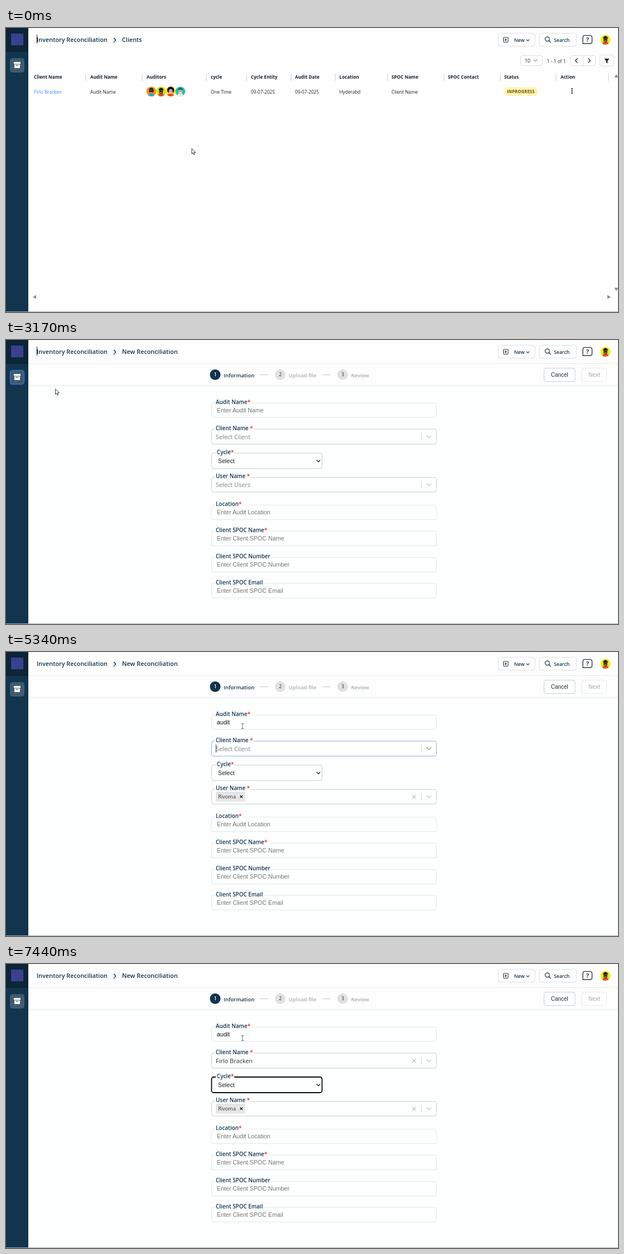
Animation, 1097 px wide and 510 px high, one loop 8000 ms. Source, as an HTML page:

```html
<!DOCTYPE html>
<html lang="en">
<head>
<meta charset="utf-8">
<title>Inventory Reconciliation</title>
<style>
  html, body { margin: 0; width: 100%; height: 100%; overflow: hidden; background: #fefefe; }
  svg { display: block; width: 100vw; height: 100vh; }
  text { font-family: "Open Sans", "Noto Sans", sans-serif; white-space: pre; }
  text.arial { font-family: "Liberation Sans", Arial, sans-serif; }
</style>
</head>
<body>
<svg id="stage" viewBox="0 0 1097 510"></svg>
<script>
(() => {
const LOOP = 8000;
const NAVY = '#12344d', INK = '#1c2b36', GREY = '#cccccc', BG = '#fdfefe';
const stage = document.getElementById('stage');

// ---- drawing helpers ----
function add(parent, tag, attrs) {
  const e = document.createElementNS('http://www.w3.org/2000/svg', tag);
  for (const k in attrs) e.setAttribute(k, attrs[k]);
  parent.appendChild(e);
  return e;
}
const group = (p, attrs) => add(p, 'g', attrs);
const box = (p, x, y, x2, y2, fill, attrs) =>
  add(p, 'rect', { x, y, width: x2 - x, height: y2 - y, fill, ...attrs });
const frame = (p, x, y, x2, y2, stroke, r = 3.5) =>
  box(p, x + .5, y + .5, x2 - .5, y2 - .5, 'none', { stroke, rx: r });
const line = (p, d, stroke, w = 1) =>
  add(p, 'path', { d, fill: 'none', stroke, 'stroke-width': w, 'stroke-linecap': 'round', 'stroke-linejoin': 'round' });
const shape = (p, d, fill) => add(p, 'path', { d, fill });
const dot = (p, cx, cy, r, fill) => add(p, 'circle', { cx, cy, r, fill });
function text(p, x, y, str, size, fill, weight = 400, cls = '') {
  const e = add(p, 'text', { x, y, 'font-size': size, 'font-weight': weight, fill, class: cls });
  e.textContent = str;
  return e;
}
const arial = (p, x, y, str, size, fill) => text(p, x, y, str, size, fill, 400, 'arial');
const chevron = (p, x, y, s, color, w) => line(p, `M${x - s} ${y - s / 2}l${s} ${s} ${s} ${-s}`, color, w);
const cross = (p, x, y, s, color, w) => line(p, `M${x - s} ${y - s}l${2 * s} ${2 * s}m0 ${-2 * s}l${-2 * s} ${2 * s}`, color, w);
const show = (e, on) => e.setAttribute('display', on ? 'inline' : 'none');
const put = (e, str) => { if (e.textContent !== str) e.textContent = str; };

// ---- time helpers ----
const within = (t, ranges) => ranges.some(([a, b]) => t >= a && t < b);
function track(t, keys, ease = u => u) {
  if (t <= keys[0][0]) return keys[0][1];
  for (let i = 1; i < keys.length; i++) {
    const [t0, a] = keys[i - 1], [t1, b] = keys[i];
    if (t < t1) return a + (b - a) * ease((t - t0) / (t1 - t0));
  }
  return keys[keys.length - 1][1];
}
const smooth = u => u * u * (3 - 2 * u);
const mix = (a, b, u) => `rgb(${a.map((v, i) => Math.round(v + (b[i] - v) * u))})`;
const typed = (t, word, times) => word.slice(0, times.filter(k => t >= k).length);

// ---- avatar ----
function avatar(p, x, y, bg, skin, hair, shirt, extra) {
  const g = group(p, { transform: `translate(${x} ${y})` });
  dot(g, 0, 0, 8.8, bg);
  shape(g, 'M-5.5 6.9Q-4 3.6 0 3.6T5.5 6.9Q0 10.6 -5.5 6.9Z', shirt);
  if (extra === 'afro') dot(g, 0, -2.6, 6.2, hair);
  box(g, -3.4, -4, 3.4, 4.6, skin, { rx: 3 });
  if (extra !== 'afro') shape(g, 'M-4 -1.6Q-4.6 -6.4 0 -6.4T4 -1.6Q0 -4.2 -4 -1.6Z', hair);
  if (extra === 'shades') box(g, -4.4, -2, 4.4, .8, '#1b2430', { rx: 1 });
  else { dot(g, -1.5, -.4, .55, '#111'); dot(g, 1.5, -.4, .55, '#111'); }
  line(g, 'M-1.3 2.4Q0 3.2 1.3 2.4', '#fff', .7);
}

// ---- list page ----
const list = group(stage);
box(list, 40, 0, 1097, 510, '#fefefe');
text(list, 208, 24.8, 'Clients', 10.85, NAVY, 600);
frame(list, 922, 49, 962, 68, '#dcdfe2');
text(list, 929.5, 62, '10', 9.2, INK);
chevron(list, 949, 58.4, 2.8, '#555');
text(list, 969.5, 62.5, '1 - 1 of 1', 8.46, INK);
frame(list, 1011, 49, 1057, 68, '#dcdfe2');
line(list, 'M1034.5 49.5V67.5', '#dcdfe2');
line(list, 'M1024 55l-3.4 3.5 3.4 3.5M1044 55l3.4 3.5 -3.4 3.5', INK, 1.3);
frame(list, 1064, 48, 1090, 69, '#dcdfe2');
shape(list, 'M1072.5 55h9l-3.4 4.2v4.2l-2.2 -1.3v-2.9z', '#111');

[[50, 'Client Name'], [151, 'Audit Name', 'Audit Name'], [252, 'Auditors'], [367, 'cycle', 'One Time'],
 [439, 'Cycle Entity', '09-07-2025'], [518, 'Audit Date', '09-07-2025'], [597.5, 'Location', 'Hyderabd'],
 [691, 'SPOC Name', 'Client Name'], [792, 'SPOC Contact'], [893, 'Status'], [994, 'Action']
].forEach(([x, head, cell = '']) => {
  text(list, x, 91, head, 8.2, '#16242f', 700);
  text(list, x, 117.6, cell, 8.25, '#222');
});
[143, 244, 359, 431, 511, 590, 684, 785, 886, 986, 1080].forEach(x => box(list, x - .5, 82.5, x + .5, 95, '#c4c8cb'));
text(list, 50, 117.6, 'Firlo Bracken', 8.25, '#3b8af0');
avatar(list, 260.5, 114, '#f9901e', '#b06a35', '#222', '#3aa6c4', 'shades');
avatar(list, 278, 114, '#d3e500', '#5a3518', '#2a1a10', '#e04a3a');
avatar(list, 295.2, 114, '#ffd92e', '#f2b48a', '#0c0c0c', '#e5482f', 'afro');
avatar(list, 312.5, 114, '#1cc7b2', '#f0c2a2', '#37566b', '#e9eef0');
box(list, 893, 106, 953, 122, '#fef5b5', { rx: 5 });
text(list, 898, 117.4, 'INPROGRESS', 7.9, '#76560f', 700);
[109.2, 113, 116.8].forEach(y => dot(list, 1014.5, y, 1.3, '#222'));
['M1090.5 89l3.5 -6 3.5 6z', 'M1090.5 466.5l3.5 6 3.5 -6z', 'M54 479.5l-6 3.5 6 3.5z', 'M1078 479.5l6 3.5 -6 3.5z']
  .forEach(d => shape(list, d, '#8c8c8c'));
const hoverMarks = group(list);
box(hoverMarks, 49, 42, 68, 56, '#f4f4f4');
box(hoverMarks, 165, 74, 953, 75, '#ececec');

// ---- form page ----
const form = group(stage);
box(form, 40, 0, 1097, 510, BG);
box(form, 40, 0, 1097, 82, '#fefefe');
box(form, 40, 42, 1097, 43, '#e6e8ea');
box(form, 40, 81.5, 1097, 82.5, '#e6e8ea');
text(form, 208, 24.8, 'New Reconciliation', 10.85, NAVY, 600);
[[375, 'Information', 390], [491.5, 'Upload file', 506.5], [603.5, 'Review', 618.5]].forEach(([x, name, tx], i) => {
  dot(form, x, 62.3, 9.5, i ? '#e1e1e1' : NAVY);
  text(form, x, 65.4, i + 1, 8.2, i ? '#555' : '#fff', 600).setAttribute('text-anchor', 'middle');
  text(form, tx, 66.6, name, 9.55, i ? '#a9adb0' : NAVY, 600);
});
line(form, 'M456 62.5h13.5M568 62.5h13.5', '#cfd2d4', 1.3);
frame(form, 964, 50, 1020.5, 75, '#c9ccce', 4);
arial(form, 976.7, 65.8, 'Cancel', 10, '#1c2b36');
frame(form, 1031.5, 50, 1077, 75, '#e4e6e8', 4);
arial(form, 1044, 65.8, 'Next', 10.1, '#a5a8ab');

// name, top, bottom, label baseline, kind, placeholder, right edge of the label gap
const rows = [
  ['Audit Name', 113, 139.5, 115, 'input', 'Enter Audit Name', 440],
  ['Client Name ', 159.5, 187.5, 161.8, 'combo', 'Select Client', 444],
  ['Cycle', 202.5, 231.5, 205.2, 'select', 'Select', 409],
  ['User Name ', 246, 273.5, 248.2, 'combo', 'Select Users', 438],
  ['Location', 296, 323, 298.4, 'input', 'Enter Audit Location', 423],
  ['Client SPOC Name', 343, 370, 345.3, 'input', 'Enter Client SPOC Name', 470],
  ['Client SPOC Number', 390, 417, 392.3, 'input', 'Enter Client SPOC Number', 476],
  ['Client SPOC Email', 436.5, 464, 439.3, 'input', 'Enter Client SPOC Email', 463]
];
const borders = {}, hints = {};
rows.forEach(([name, y, y2, base, kind, hint, gap]) => {
  const key = name.trim(), select = kind === 'select', combo = kind === 'combo';
  borders[key] = frame(form, 368, y, select ? 567 : 772, y2, kind === 'input' ? '#e2e6ea' : GREY);
  box(form, select ? 376 : 374, base - 6, gap, base + 2, BG);
  const label = text(form, select ? 378 : 376, base, name, 9.9, NAVY, 600);
  if (!/Number|Email/.test(name)) add(label, 'tspan', { fill: '#e8272b' }).textContent = '*';
  const mid = (y + y2) / 2;
  hints[key] = combo ? text(form, 376, mid + 4.3, hint, 10.95, '#808080')
    : arial(form, select ? 380 : 378, mid + 3.8, hint, 10.7, select ? '#222' : '#757575');
  if (combo) line(form, `M745 ${mid - 6.5}v13`, GREY, .9);
  if (select) chevron(form, 560, mid + .3, 2.7, '#222', 1.4);
});
const clientArrow = chevron(form, 758, 173.6, 3.7, GREY, 1.5);
chevron(form, 758, 259.8, 3.7, GREY, 1.5);

const chip = group(form);
box(chip, 376, 251, 429, 268.5, '#e6e6e6', { rx: 1.5 });
text(chip, 380, 263.2, 'Rivoma', 9.25, '#333');
cross(chip, 421.8, 259.8, 1.8, '#222', 1.4);
cross(chip, 731.5, 259.8, 2.7, '#c2c2c2', 1.4);

const auditText = arial(form, 378, 130, '', 10.7, '#111');
const clientText = text(form, 376, 177.8, '', 10.95, '#333');
const clear = cross(form, 731.5, 173.5, 2.7, '#c2c2c2', 1.4);
const auditCaret = box(form, 0, 120, 1, 132, '#000');
const clientCaret = box(form, 0, 166, 1, 180.5, '#333');

// ---- filtered menu ----
const names = ['Quorl Firnos Systems', 'Quorl Firnos Mining', 'Dalfen Traders', 'Obel Firt', 'Firlo Bracken',
  'Norfel Textiles', 'Fibrow Plastics', 'Wolfrane Supply', 'Fendrow Motors'];
const menu = group(stage);
const menuShadow = box(menu, 368, 194, 772.5, 194, 'rgba(0,0,0,.13)', { rx: 3 });
const menuBox = box(menu, 368, 192.5, 772, 192.5, '#fefefe', { rx: 3, stroke: '#dadada', 'stroke-width': .8 });
box(menu, 368.5, 196, 771.5, 223, '#dceafe');
const options = names.map((n, i) => text(menu, 377, 214 + i * 27.1, '', 10.7, '#222'));

function drawMenu(query) {
  const hits = names.filter(n => n.toLowerCase().includes(query));
  const height = Math.min(215, hits.length * 27.1 + 6.5);
  menuBox.setAttribute('height', height);
  menuShadow.setAttribute('height', height + 1);
  options.forEach((o, i) => put(o, i < 8 && hits[i] || ''));
}

// ---- shared header and sidebar ----
const shell = group(stage);
text(shell, 55, 24.8, 'Inventory Reconciliation', 10.85, NAVY, 600);
line(shell, 'M193.3 18l3.4 3.7 -3.4 3.7', NAVY, 1.4);
frame(shell, 882, 9, 949, 33, '#dcdfe2');
frame(shell, 891, 16.5, 900.5, 26, INK, 1);
line(shell, 'M893.7 21.2h4M895.7 19.2v4', INK, 1.1);
text(shell, 910.8, 24.6, 'New', 8.7, NAVY, 600);
chevron(shell, 935.5, 22, 2.3, NAVY, 1.2);
frame(shell, 955.5, 9, 1023, 33, '#dcdfe2');
add(shell, 'circle', { cx: 970.3, cy: 19.8, r: 3.9, fill: 'none', stroke: INK, 'stroke-width': 1.2 });
line(shell, 'M973.2 22.8l3 3.1', INK, 1.3);
text(shell, 982, 24.6, 'Search', 8.7, NAVY, 600);
line(shell, 'M1034 28V17q0 -3.6 3.6 -3.6h9.3q3.6 0 3.6 3.6v7.4q0 3.6 -3.6 3.6z', '#2f3b45', 1.4);
text(shell, 1042.3, 24.8, '?', 11, '#2f3b45', 700).setAttribute('text-anchor', 'middle');
avatar(shell, 1074.5, 21, '#e6f000', '#5a3518', '#2a1a10', '#e04a3a');
const titleCaret = box(shell, 55, 12, 56, 28, '#111');

box(shell, 0, 0, 40, 510, NAVY);
box(shell, 0, 0, 40, 43, '#0c2536');
box(shell, 9, 10, 31, 31, '#3a4090');
box(shell, 7, 54, 33, 80, '#3f5b70', { rx: 4.5 });
const ring = box(shell, 7.5, 54.5, 32.5, 79.5, 'none', { rx: 4.5, stroke: '#2f6fd0', 'stroke-width': 1.4 });
box(shell, 14, 61, 26, 64.5, '#fff', { rx: .8 });
shape(shell, 'M15 65.5h10v5q0 1.5 -1.5 1.5h-7q-1.5 0 -1.5 -1.5z', '#fff');
box(shell, 18, 66.8, 22, 68, '#3f5b70');
box(shell, 0, 509, 1097, 510, '#a3abb0');
const bar = box(shell, 0, 0, 0, 2, NAVY);

// ---- sidebar flyout ----
const fly = group(stage);
box(fly, 41, 57, 166, 125, 'rgba(0,0,0,.12)', { rx: 4 });
box(fly, 40.5, 56, 165, 124, NAVY, { rx: 3.5, opacity: .84 });
text(fly, 48, 71.5, 'Inventory Reconciliation', 8.23, '#fff');
arial(fly, 64, 93.4, 'New Reconciliation', 7.2, '#fff');
arial(fly, 64, 115.4, 'Inventory Records', 7.2, '#fff');
line(fly, 'M53 87.5v4.6M51.3 90.5l1.7 1.7 1.7 -1.7M50 94.8h6', '#d7dee3', .9);
line(fly, 'M49.8 110.3h6.4v5.6h-6.4zM49.8 112.2h6.4M49.8 114.1h6.4M51.8 110.3v5.6', '#c5ced5', .7);

// ---- pointers, each with its hot spot at 0,0 ----
const pointer = group(stage);
const arrow = add(pointer, 'path', { d: 'M0 0V9.6L2.2 7.6 3.8 11 5.3 10.3 3.8 7H6.8Z', fill: '#fff', stroke: '#222', 'stroke-width': .9 });
const hand = add(pointer, 'path', {
  d: 'M-1.2 .8Q0 -.8 1.2 .8V4.6Q2.6 4 3.3 5.2 4.6 4.8 5 5.9 6.3 5.7 6.3 7.2V9.5Q6 11.5 5 13H-.6Q-1.6 10.6 -3.6 8.4 -3.2 6.6 -1.2 8Z',
  fill: '#fff', stroke: '#111', 'stroke-width': .9 });
const beam = line(pointer, 'M-2 -4.8Q0 -4.8 0 -3.8 0 -4.8 2 -4.8M0 -3.8V3.8M-2 4.8Q0 4.8 0 3.8 0 4.8 2 4.8', '#555', .9);

const pathX = [[1290, 333], [2040, 27.5], [2290, 27.5], [2790, 88.5], [3350, 88.5], [4090, 424]];
const pathY = [[1290, 216.5], [2040, 66.5], [2290, 66.5], [2790, 88], [3350, 88], [4090, 133]];
const barWidth = [[3350, 0], [4140, 745], [4420, 825], [4850, 1097]];
const titleOn = [[0, 280], [780, 1290], [1790, 2290], [2440, 2940], [3130, 3640]];
const clientCaretOn = [[5340, 5870], [6170, 7350]];

function focusBox(e, on, idle) {
  e.setAttribute('stroke', on ? '#0b0b0b' : idle);
  e.setAttribute('stroke-width', on ? 1.8 : 1);
}

function draw(t) {
  const onForm = t >= 3130;
  show(list, !onForm);
  show(form, onForm);
  show(hoverMarks, t >= 2040);
  show(titleCaret, within(t, titleOn));
  show(ring, within(t, [[3130, 3380]]));

  const flyOn = within(t, [[2040, 3130]]);
  show(fly, flyOn);
  fly.setAttribute('opacity', track(t, [[2040, 0], [2200, 1]]));

  const x = track(t, pathX, smooth), y = track(t, pathY, smooth);
  pointer.setAttribute('transform', `translate(${x} ${y})`);
  const overInput = onForm && x > 368 && y > 113;
  const overLink = !onForm && x < 40 || flyOn;
  show(beam, overInput);
  show(hand, overLink);
  show(arrow, !overInput && !overLink);

  bar.setAttribute('width', t < 4970 ? track(t, barWidth) : 0);
  show(chip, t >= 3600);
  show(hints['User Name'], t < 3600);

  // audit name
  const auditFocus = within(t, [[4110, 5340]]);
  focusBox(borders['Audit Name'], auditFocus, '#e2e6ea');
  put(auditText, typed(t, 'audit', [4260, 4390, 4520, 4650, 4790]));
  show(hints['Audit Name'], t < 4260);
  show(auditCaret, auditFocus);

  // client name
  const query = typed(t, 'firlo', [6170, 6400, 6480, 6590, 6740]);
  const picked = t >= 7040;
  put(clientText, picked ? 'Firlo Bracken' : query);
  show(hints['Client Name'], !query);
  show(clear, picked);
  show(clientCaret, within(t, clientCaretOn));
  const glow = track(t, [[5310, 0], [5400, 1], [7350, 1], [7440, 0]]);
  borders['Client Name'].setAttribute('stroke', mix([204, 204, 204], [32, 108, 226], glow));
  borders['Client Name'].setAttribute('stroke-width', 1 + .8 * (glow > .5));
  clientArrow.setAttribute('stroke', mix([204, 204, 204], [85, 85, 85], glow));

  const open = query && !picked;
  show(menu, open);
  if (open) drawMenu(query);
  focusBox(borders.Cycle, t >= 7350, GREY);

  if (onForm) {
    auditCaret.setAttribute('x', 378 + auditText.getComputedTextLength());
    clientCaret.setAttribute('x', 376 + clientText.getComputedTextLength());
  }
}

const start = performance.now();
function tick() {
  draw((performance.now() - start) % LOOP);
  requestAnimationFrame(tick);
}
tick();
})();
</script>
</body>
</html>
```
